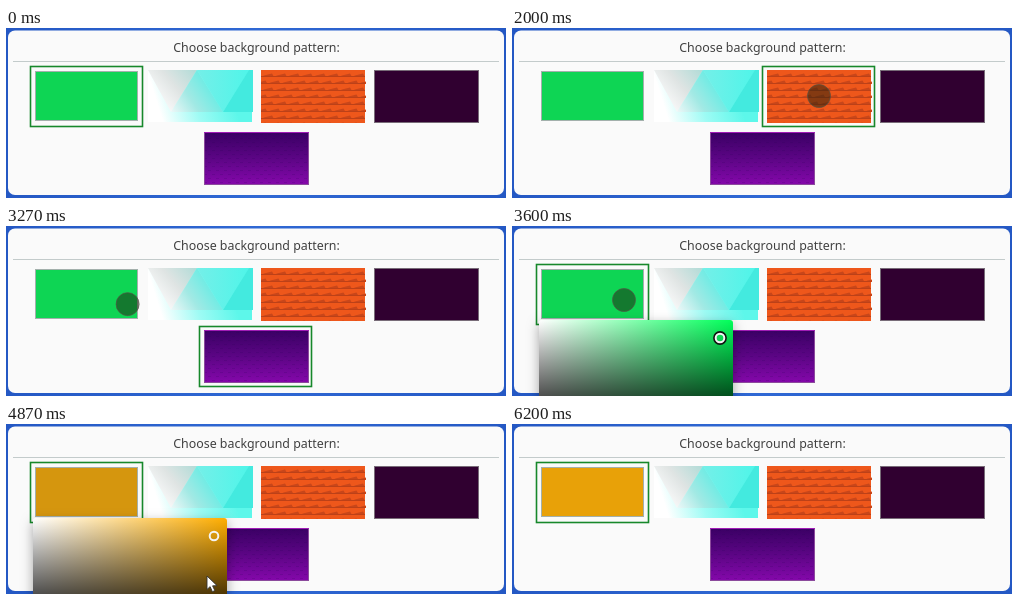
Animation of 500 by 170 pixels, one loop 6870 ms. Source, as an HTML page with a canvas:

```html
<!DOCTYPE html>
<html lang="en">
<head>
<meta charset="utf-8">
<title>Background pattern chooser</title>
<style>
html, body { margin: 0; width: 100%; height: 100%; overflow: hidden; }
canvas { display: block; }
h1 {
  position: absolute; left: 0; top: 10px; width: 501px; margin: 0;
  font: 500 12.4px/19px "Noto Sans", "Open Sans", sans-serif;
  text-align: center; color: #404040;
}
</style>
</head>
<body>
<canvas id="stage" width="500" height="170"></canvas>
<h1>Choose background pattern:</h1>
<script>
const ctx = document.getElementById('stage').getContext('2d');
const LOOP = 6870, TICK = 1000 / 15, SPEED = 26;
const TILE_W = 105, TILE_H = 53;
const [GREEN, CYAN, ORANGE, DARK, PURPLE] = [0, 1, 2, 3, 4];
const OPEN = 54, RECOLOR = 67, GRAB = 76, RELEASE = 82, CLOSE = 88;
const area = { x: 27, y: 94, w: 194, h: 110 };

// Each stop: tick of departure, destination, tile selected on departure.
const touch = [
  [17, 455, 78, GREEN], [17, 421, 63, GREEN], [22, 307, 68, DARK], [30, 203, 68, ORANGE],
  [37, 254, 135, CYAN], [44, 112, 74, PURPLE], [OPEN, 101, 184, GREEN]
];
const arrow = [
  [73, 201, 152], [73, 212, 126], [75.3, 213, 107], [79, 215, 104],
  [RELEASE, 357, 132], [90, 350, 176]
];

// Glides from stop to stop; longer ways take longer.
function follow(stops, t) {
  let [, x, y] = stops[0];
  for (const [start, tx, ty] of stops) {
    const span = Math.max(1, Math.hypot(tx - x, ty - y)) / SPEED;
    const p = Math.max(0, Math.min(1, (t - start) / span));
    const e = p * p * (3 - 2 * p);
    x += (tx - x) * e;
    y += (ty - y) * e;
  }
  return [x, y];
}

const hueAt = t => t < RECOLOR ? 141 : 41 + 6 * Math.exp(2.5 * (RECOLOR - t));

const tilePos = i => i === PURPLE ? [198, 104] : [Math.round(28.6 + i * 113.2), 42];

function hsv(h, s, v) {
  const f = n => {
    const k = (n + h / 60) % 6;
    return Math.round(255 * v * (1 - s * Math.max(0, Math.min(k, 4 - k, 1))));
  };
  return `rgb(${f(5)},${f(3)},${f(1)})`;
}

function gradient(x0, y0, x1, y1, ...colors) {
  const g = ctx.createLinearGradient(x0, y0, x1, y1);
  colors.forEach((c, i) => g.addColorStop(i / (colors.length - 1), c));
  return g;
}

function rect(x, y, w, h, fill) {
  ctx.fillStyle = fill;
  ctx.fillRect(x, y, w, h);
}

function outline(x, y, w, h, color, width = 1) {
  ctx.strokeStyle = color;
  ctx.lineWidth = width;
  ctx.strokeRect(x + 0.5, y + 0.5, w - 1, h - 1);
}

function poly(fill, ...pts) {
  ctx.fillStyle = fill;
  ctx.beginPath();
  for (let i = 0; i < pts.length; i += 2) ctx.lineTo(pts[i], pts[i + 1]);
  ctx.closePath();
  ctx.fill();
}

function disc(x, y, r, fill, stroke, width) {
  ctx.beginPath();
  ctx.arc(x, y, r, 0, 7);
  if (fill) { ctx.fillStyle = fill; ctx.fill(); }
  ctx.strokeStyle = stroke;
  ctx.lineWidth = width;
  ctx.stroke();
}

function roundBox(x, y, w, h, r, fill) {
  ctx.fillStyle = fill;
  ctx.beginPath();
  ctx.roundRect(x, y, w, h, r);
  ctx.fill();
}

// Runs a painter in tile coordinates, clipped to the tile.
function inTile(i, paint) {
  ctx.save();
  ctx.translate(...tilePos(i));
  ctx.beginPath();
  ctx.rect(0, 0, TILE_W, TILE_H);
  ctx.clip();
  paint();
  ctx.restore();
}

function paintPanel() {
  rect(0, 0, 500, 170, gradient(0, 0, 500, 0, '#2458c4', '#2f68d4', '#2458c4'));
  roundBox(2, 2.5, 496, 164.5, 7, '#fafafa');
  rect(7, 33, 486, 1, '#c3cbcb');
}

function paintColor(color) {
  rect(0, 1, 103, 50, color);
  outline(0, 1, 103, 50, '#a3b0ac');
}

function paintTriangles() {
  rect(0, 0, 104, 52, gradient(15, 52, 85, 30, '#ffffff', '#9dfbf4', '#5df7ea'));
  poly(gradient(8, 32, 46, 0, '#fcfcfc', '#dfe4e3', '#b4dcd8'), 0, 0, 49, 0, 23, 42);
  poly(gradient(24, 44, 64, 18, '#eef8f8', '#a2e9e4', '#6aece4'), 49, 0, 75, 42, 23, 42);
  poly(gradient(49, 0, 101, 0, '#74efe8', '#4ff5e9'), 49, 0, 101, 0, 75, 42);
  poly('#43eadf', 101, 0, 105, 0, 105, 42, 75, 42);
}

function paintShingles() {
  rect(0, 0, 104, TILE_H, '#ee571b');
  for (let row = 0; row < 8; row++) {
    const y = row * 7;
    for (let x = -13 + row % 2 * 6.5; x < 104; x += 13)
      poly('#c8461a', x, y + 7, x + 3, y + 5.5, x + 11, y + 3.5, x + 13, y + 7);
    rect(0, y + 6, 104, 1, '#bc4118');
  }
}

function paintDark() {
  rect(0, 0, TILE_W, TILE_H, '#300030');
  outline(0, 0, TILE_W, TILE_H, '#786c78');
}

function paintNight() {
  rect(0, 0, TILE_W, TILE_H, gradient(0, 0, 0, TILE_H, '#3a0064', '#5c0585', '#8508ab'));
  for (let row = 0; row < 13; row++)
    for (let x = row % 2 * 4; x < TILE_W; x += 8) rect(x, row * 4 + 2, 3, 1, 'rgba(40,0,80,.16)');
  outline(0, 0, TILE_W, TILE_H, '#8b4a9c');
  rect(0, 0, TILE_W, 1, '#a11cb6');
}

function paintPicker(hue, mx, my, active) {
  const { x, y, w, h } = area;
  ctx.save();
  ctx.shadowColor = 'rgba(0,0,0,.35)';
  ctx.shadowBlur = 12;
  ctx.shadowOffsetY = 4;
  roundBox(x, y, w, h, 3, '#fff');
  ctx.restore();
  roundBox(x, y, w, h, 3, gradient(x, 0, x + w, 0, '#fff', hsv(hue, 1, 1)));
  roundBox(x, y, w, h, 3, gradient(0, y, 0, y + h, 'rgba(0,0,0,0)', '#000'));
  if (active) disc(mx, my, 5.9, null, '#111', 2);
  disc(mx, my, 4.3, null, '#f4f4f4', 2);
}

function paintArrow(x, y) {
  ctx.save();
  ctx.translate(x, y);
  ctx.scale(1.12, 1.12);
  ctx.lineJoin = 'round';
  poly('#fff', 0, 0, 0, 12, 2.8, 9.5, 4.8, 14, 7, 13, 5, 8.8, 9, 8.6);
  ctx.strokeStyle = '#333';
  ctx.lineWidth = 0.8;
  ctx.stroke();
  ctx.restore();
}

function draw(t) {
  const grabbed = t >= GRAB;
  const [ax, ay] = follow(arrow, Math.min(t, RELEASE));
  const [mx, my] = grabbed ? [ax - 1, ay] : [208, 112];
  const color = hsv(hueAt(t), (mx - area.x) / area.w, 1 - (my - area.y) / area.h);
  const last = touch.filter(s => s[0] <= t).pop();
  const [sx, sy] = tilePos(last ? last[3] : GREEN);

  paintPanel();
  inTile(GREEN, () => paintColor(color));
  inTile(CYAN, paintTriangles);
  inTile(ORANGE, paintShingles);
  inTile(DARK, paintDark);
  inTile(PURPLE, paintNight);
  outline(sx - 5, sy - 4, 113, 61, '#17882b', 1.6);

  // The area already shows the new hue while the tile still fades to it.
  if (t >= OPEN && t < CLOSE)
    paintPicker(t < RECOLOR ? hueAt(t) : hueAt(t + 1), mx, my, t < RECOLOR || grabbed);
  if (t >= 17 && t < 60)
    disc(...follow(touch, t), 11.5, 'rgba(25,30,10,.5)', 'rgba(85,85,70,.7)', 1);
  if (t >= 73 && t < 93) paintArrow(...follow(arrow, t));
}

function frame() {
  draw(Math.floor((performance.now() % LOOP + 4) / TICK));
  requestAnimationFrame(frame);
}
frame();
</script>
</body>
</html>
```
